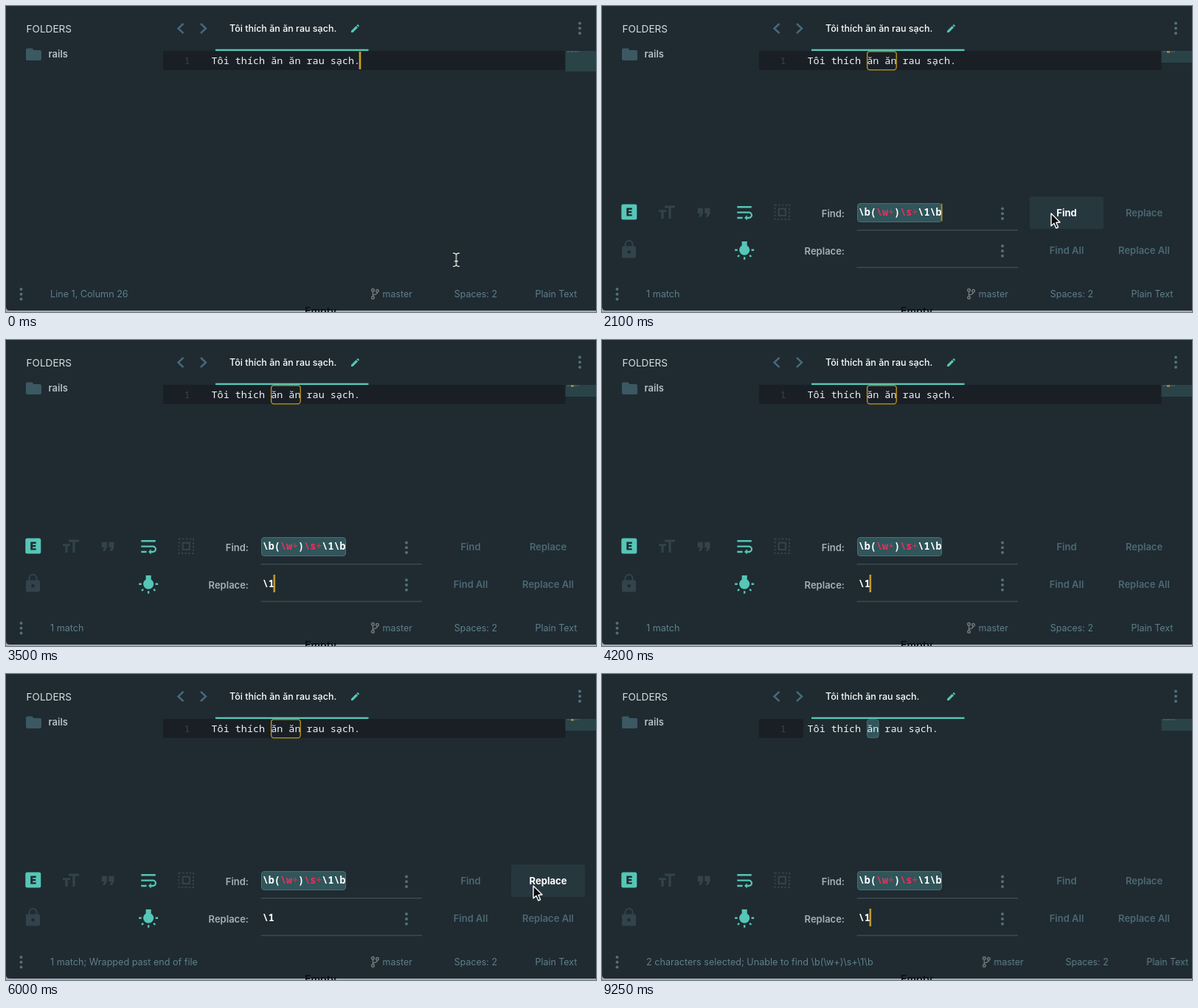
Write an HTML page that moves like this. It is 800 px wide and 416 px high and loops after 9300 ms.

```html
<!DOCTYPE html>
<html lang="vi">
<head>
<meta charset="utf-8">
<title>Find and replace</title>
<style>
  html, body { margin: 0; width: 100%; height: 100%; overflow: hidden; background: #1f2b31; }
  svg { display: block; width: 800px; height: 416px; }
  text { font: 400 12.62px Inter, Roboto, sans-serif; fill: #5f7f8c; white-space: pre; }
  .mono { font: 400 13.45px "Noto Sans Mono", "DejaVu Sans Mono", monospace; fill: #eef4f5; }
  .field { font-weight: 600; fill: #fff; }
  .title { font-weight: 500; font-size: 12.5px; fill: #fff; }
  .bold { font-weight: 600; font-size: 13px; }
  .right { font-size: 12.45px; }
  .label { fill: #a3b1b7; text-anchor: end; }
  .button { fill: #4d6874; text-anchor: middle; }
  .hot { fill: #fff; font-weight: 700; text-anchor: middle; }
  .token { fill: #e5305f; }
  .plus { fill: #c9304a; }
  .teal { fill: #56c6b7; }
  .dim { fill: #33434b; }
  .dimLine { fill: none; stroke: #33434b; stroke-width: 2; }
  .caret { fill: #fcc02c; }
  .hover { fill: #27373e; }
  .picked { fill: #30555a; stroke: #4c7074; }
  .chevron { fill: none; stroke: #47697a; stroke-width: 2.4; }
  .rule { fill: #394b53; }
</style>
</head>
<body>
<svg viewBox="0 0 800 416">
  <defs>
    <g id="dots" fill="#546f7b">
      <circle cy="-6.7" r="2"/><circle r="2"/><circle cy="6.7" r="2"/>
    </g>
    <path id="beamShape" d="M-4-9Q0-9 0-6Q0-9 4-9M0-6V6M-4 9Q0 9 0 6Q0 9 4 9M-2 2H2"/>
  </defs>

  <!-- window -->
  <rect width="800" height="416" fill="#a3abad"/>
  <path d="M0 0H800V414H5Q0 414 0 409Z" fill="#1f2b31"/>
  <text x="405" y="420" class="bold" style="fill:#0b0f11;font-size:14px">Empty</text>

  <!-- sidebar -->
  <text x="27.5" y="35.5" style="font-size:13.6px;fill:#d5dde0">FOLDERS</text>
  <path d="M29 57.5h6.5l2.2 2.4H46q2 0 2 2V72q0 2-2 2H29q-2 0-2-2V59.5q0-2 2-2Z" fill="#3b5863"/>
  <text x="57.5" y="70.3" class="bold" style="fill:#b3c0c5">rails</text>

  <!-- tab bar -->
  <path class="chevron" d="M240.5 24l-7 6.5 7 6.5M264 24l7 6.5-7 6.5"/>
  <text id="titleBefore" class="title" x="303" y="34.8">Tôi thích ăn ăn rau sạch.</text>
  <text id="titleAfter" class="title" x="303" y="34.8">Tôi thích ăn rau sạch.</text>
  <path class="teal" transform="translate(466.2 23.2) scale(.61)"
    d="M3 17.25V21h3.75L17.81 9.94l-3.75-3.75ZM20.71 7.04a1 1 0 0 0 0-1.41l-2.34-2.34a1 1 0 0 0-1.41 0l-1.83 1.83 3.75 3.75Z"/>
  <use href="#dots" x="778" y="30.3"/>

  <!-- editor -->
  <rect x="213" y="61" width="60" height="26" fill="#191f25"/>
  <rect id="lineBand" x="273" y="61" width="485.5" height="26" fill="#191f25"/>
  <rect class="teal" x="284" y="58.7" width="207.5" height="2.4"/>
  <text class="mono" x="241.5" y="78.5" style="fill:#37434a">1</text>
  <rect id="result" class="picked" x="359.5" y="61.7" width="15.5" height="25" rx="3.5"/>
  <text id="codeBefore" class="mono" x="278.5" y="78.5">Tôi thích ăn ăn rau sạch.</text>
  <text id="codeAfter" class="mono" x="278.5" y="78.5">Tôi thích ăn rau sạch.</text>
  <rect id="match" x="359.6" y="61.8" width="39.6" height="25" rx="3.5" fill="none" stroke="#c79a20" stroke-width="1.3"/>
  <rect id="editorCaret" class="caret" x="478.7" y="62" width="2.6" height="24"/>

  <!-- minimap -->
  <rect x="758.5" y="61" width="41.5" height="16" fill="#2a4347"/>
  <rect id="mapTall" x="758.5" y="77" width="41.5" height="12" fill="#2a4347"/>
  <path d="M761 62h16" stroke="#71868b" stroke-dasharray="3 1 5 1" opacity=".7"/>
  <rect id="mapMatch" x="766" y="61.5" width="4" height="2" fill="#c79a20"/>

  <!-- find panel -->
  <g id="panel">
    <rect class="teal" x="26.3" y="269.5" width="21" height="21" rx="2.5"/>
    <path d="M33.3 274.5h7.4v2.4h-4.6v1.9h4.2v2.4h-4.2v2h4.6v2.4h-7.4Z" fill="#1f2b31"/>
    <path class="dim" d="M85 271.5h14v3h-5.4v14.5h-3.2V274.5H85ZM77 277.3h10v2.8h-3.4V289h-3.2v-8.9H77Z"/>
    <path class="dim" transform="translate(123.7 266.4) scale(1.2)" d="M6 17h3l2-4V7H5v6h3Zm8 0h3l2-4V7h-6v6h3Z"/>
    <path class="teal" transform="translate(178.4 266) scale(1.22)"
      d="M4 19h6v-2H4ZM20 5H4v2h16ZM17 11H4v2h13.25c1.1 0 2 .9 2 2s-.9 2-2 2H15v-2l-3 3 3 3v-2h2c2.2 0 4-1.8 4-4s-1.8-4-4-4Z"/>
    <rect class="dimLine" x="234.5" y="270.5" width="19.5" height="19.5" stroke-dasharray="2.4 2.4"/>
    <rect class="dimLine" x="239.7" y="275.7" width="9.2" height="9.2"/>
    <path class="dim" fill-rule="evenodd" d="M29 326.5H44q2 0 2 2V340q0 2.5-2 2.5H29q-2 0-2-2.5V328.5q0-2 2-2ZM36.5 332a2.3 2.3 0 1 0 .1 0Z"/>
    <path class="dimLine" d="M31.5 327v-3a5 5 0 0 1 10 0v3"/>
    <path class="teal" transform="translate(179 318.2) scale(1.18)"
      d="M3.55 18.54l1.41 1.41 1.8-1.79-1.41-1.41ZM11 22.45h2V19.5h-2ZM4 10.5H1v2h3ZM15 6.31V1.5H9v4.81C7.21 7.35 6 9.28 6 11.5a6 6 0 0 0 12 0c0-2.22-1.21-4.15-3-5.19ZM20 10.5v2h3v-2ZM17.24 18.16l1.79 1.8 1.41-1.41-1.79-1.79Z"/>

    <text class="bold label" x="329" y="286.6">Find:</text>
    <text class="bold label" x="329" y="337.6">Replace:</text>
    <rect class="rule" x="345.5" y="304" width="218.5" height="1.5"/>
    <rect class="rule" x="345.5" y="354.7" width="218.5" height="1.5"/>
    <use href="#dots" x="543" y="282.3"/>
    <use href="#dots" x="543" y="333"/>

    <rect id="selection" class="picked" x="346.5" y="268.5" width="114" height="25" rx="3.5"/>
    <text class="mono field" x="347.7" y="284.5">\b(<tspan class="token">\w</tspan><tspan class="plus">+</tspan>)<tspan class="token">\s</tspan><tspan class="plus">+</tspan>\1\b</text>
    <rect id="findCaret" class="caret" x="459.5" y="268.5" width="2.4" height="24"/>
    <text id="slash" class="mono field" x="347.7" y="335.5">\</text>
    <text id="digit" class="mono field" x="355.75" y="335.5">1</text>
    <g id="caretSlot"><rect id="replaceCaret" class="caret" x="346.5" y="319" width="2.4" height="24"/></g>

    <rect id="findHover" class="hover" x="580" y="259" width="100" height="44" rx="2"/>
    <rect id="replaceHover" class="hover" x="685" y="259" width="100" height="44" rx="2"/>
    <text id="findIdle" class="bold button" x="630" y="286">Find</text>
    <text id="findHot" class="bold hot" x="630" y="286">Find</text>
    <text id="replaceIdle" class="bold button" x="735" y="286">Replace</text>
    <text id="replaceHot" class="bold hot" x="735" y="286">Replace</text>
    <text class="bold button" x="630" y="336.5">Find All</text>
    <text class="bold button" x="735" y="336.5">Replace All</text>
  </g>

  <!-- status bar -->
  <use href="#dots" x="20.5" y="391.7"/>
  <text id="statusLine" x="60" y="396.3">Line 1, Column 26</text>
  <text id="statusMatch" x="60" y="396.3">1 match</text>
  <text id="statusWrap" x="60" y="396.3">1 match; Wrapped past end of file</text>
  <text id="statusDone" x="60" y="396.3">2 characters selected; Unable to find \b(\w+)\s+\1\b</text>
  <g id="statusRight">
    <g fill="none" stroke="#75797a" stroke-width="1.4">
      <circle cx="497.5" cy="386.3" r="1.8"/><circle cx="497.5" cy="396.5" r="1.8"/><circle cx="503.5" cy="387.3" r="1.8"/>
      <path d="M497.5 388v7M503.5 389q0 3-6 4"/>
    </g>
    <text class="right" x="510.5" y="396.3">master</text>
    <text class="right" x="607.7" y="396.3">Spaces: 2</text>
    <text class="right" x="717.5" y="396.3">Plain Text</text>
  </g>

  <!-- pointer -->
  <g id="pointer">
    <g id="beam" fill="none" stroke-linecap="round">
      <use href="#beamShape" stroke="#10171a" stroke-width="3"/>
      <use href="#beamShape" stroke="#f2f4f4" stroke-width="1.3"/>
    </g>
    <path id="arrow" d="M0 0V17L4 13.5 6.8 20 9.6 18.8 6.9 12.5 12 12Z" fill="#0c1012" stroke="#fff" stroke-width="1.4" stroke-linejoin="round"/>
  </g>
</svg>

<script>
  const LOOP = 9300;
  const OPEN = 1250, FOCUS = 2550, WRAP = 6000, SWAP = 7200;

  // Points are [ms, value]; "step-end" holds each value, "linear" blends.
  function track(id, prop, points, easing = "linear") {
    const all = [...points, [LOOP, points[points.length - 1][1]]];
    const frames = all.map(([ms, value]) => ({ offset: ms / LOOP, [prop]: value, easing }));
    document.getElementById(id).animate(frames, { duration: LOOP, iterations: Infinity });
  }

  const show = (ids, ...spans) => ids.split(" ").forEach(id => {
    const points = spans.flatMap(([from, to]) => [[from, 1], [to, 0]]).filter(p => p[0] < LOOP);
    if (points[0][0] > 0) points.unshift([0, 0]);
    track(id, "opacity", points, "step-end");
  });

  const move = (x, y) => `translate(${x}px, ${y}px)`;

  // Smooth blink: solid, fade out, dark, fade in; restarts at each reset.
  function blinkLevel(age) {
    const p = age % 1000;
    if (p < 200) return 1;
    if (p < 450) return 1 - (p - 200) / 250;
    return Math.max(0, (p - 750) / 250);
  }

  function blink(id, from, to, resets) {
    const points = [];
    for (let t = 0; t < LOOP; t += 50) {
      const start = resets.filter(r => r <= t).pop();
      points.push([t, t >= from && t < to ? blinkLevel(t - start) : 0]);
    }
    track(id, "opacity", points, "step-end");
  }

  show("titleBefore codeBefore lineBand", [0, SWAP]);
  show("titleAfter codeAfter result statusDone", [SWAP, LOOP]);
  show("match mapMatch", [OPEN, SWAP]);
  show("panel", [OPEN, LOOP]);
  show("mapTall statusLine", [0, OPEN]);
  show("statusMatch", [OPEN, WRAP]);
  show("statusWrap", [WRAP, SWAP]);
  show("slash", [3100, LOOP]);
  show("digit", [3250, LOOP]);
  show("findIdle", [0, OPEN], [2250, LOOP]);
  show("findHot", [OPEN, 2250]);
  show("replaceIdle", [0, 5650], [8150, LOOP]);
  show("replaceHot", [5650, 8150]);

  track("selection", "opacity", [[0, 0.3], [1300, 0.3], [1500, 1]]);
  track("findHover", "opacity", [[0, 0], [1300, 0], [1500, 1], [2200, 1], [2350, 0]]);
  track("replaceHover", "opacity", [[0, 0], [5600, 0], [5800, 1], [8150, 1], [8350, 0]]);
  track("statusRight", "transform", [[0, move(0, 0)], [SWAP, move(20.7, 0)]], "step-end");
  track("caretSlot", "transform",
    [[0, move(0, 0)], [3100, move(8.05, 0)], [3250, move(16.1, 0)]], "step-end");

  blink("editorCaret", 0, OPEN, [-250, 1000]);
  blink("findCaret", OPEN, FOCUS, [OPEN]);
  blink("replaceCaret", FOCUS, LOOP, [FOCUS, 3100, 3250, 7300]);

  show("beam", [0, OPEN], [2300, 3100], [5100, 5350]);
  show("arrow", [OPEN, 2300], [5350, 8400]);
  track("pointer", "transform", [
    [0, 610.5, 345], [50, 610.5, 345], [200, 581.5, 271], [1300, 581.5, 271],
    [1500, 609, 282], [2200, 609, 282], [2500, 441.5, 328], [5100, 441.5, 328],
    [5700, 715, 288], [6150, 715, 288], [6500, 727, 284.5], [8050, 727, 284.5], [8400, 665, 245]
  ].map(([ms, x, y]) => [ms, move(x, y)]), "ease-in-out");
</script>
</body>
</html>
```
